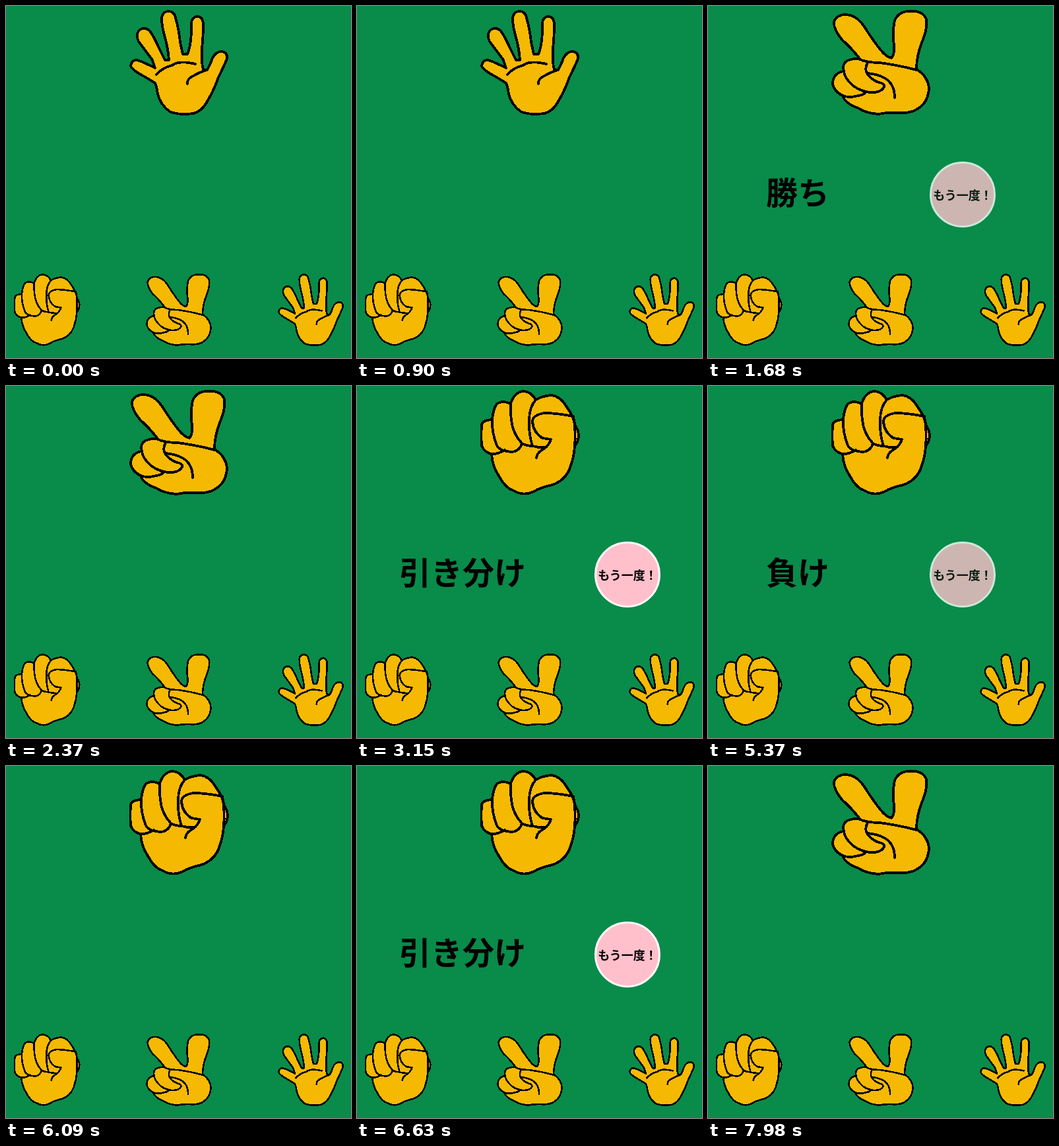
An HTML page for the animation above (8000 ms loop, 523 px wide and 534 px high).

```html
<!DOCTYPE html>
<html lang="ja">
<head>
<meta charset="utf-8">
<title>じゃんけん</title>
<style>
  html, body { margin: 0; width: 100%; height: 100%; overflow: hidden; background: #098b4a; }
  svg { display: block; width: 100%; height: 100%; }
  .hand path { fill: none; stroke: #000; stroke-width: 3.8; stroke-linejoin: round; stroke-linecap: round; shape-rendering: crispEdges; }
  .hand .skin { fill: #f6b902; }
  text { font: bold 48px "Noto Sans CJK JP", "Noto Sans CJK", sans-serif; }
  #retry text { font-size: 18px; text-anchor: middle; }
</style>
</head>
<body>
<svg viewBox="0 0 523 534">
  <defs>
    <g id="rock" class="hand">
      <path class="skin" d="M205 51Q191 52 189 58Q188 75 189 91Q194 101 204 103Q205 122 216 138Q225 155 238 159Q252 167 266 161
        Q280 153 296 150Q316 143 323 124Q329 108 330 91Q336 84 336 74Q335 65 331 61Q328 45 318 32Q309 16 295 14
        Q281 15 271 21Q264 8 251 8Q238 10 233 27Q221 21 212 27Q206 36 205 51Z"/>
      <path d="M205 51Q204 70 212 90Q216 99 236 100Q247 98 250 87Q236 72 234 52Q232 39 233 27"/>
      <path d="M204 103Q213 104 224 97M271 21Q261 32 261 52Q260 72 266 91Q257 91 250 87"/>
      <path d="M328 46Q302 41 284 41Q266 44 266 54Q267 70 281 79L294 81Q291 90 284 95Q273 100 272 109"/>
      <path d="M266 91Q277 94 286 93M328 46Q332 70 330 91"/>
    </g>
    <g id="scissors" class="hand">
      <path class="skin" d="M230 80Q217 63 203 51Q190 35 191 24Q195 13 209 13Q225 14 236 30Q252 55 262 67Q270 77 278 79
        Q283 74 282 60Q279 40 283 22Q289 8 305 8Q325 6 331 20Q333 34 325 53Q316 75 316 96Q334 107 335 126
        Q333 148 316 157Q306 163 290 162Q272 161 258 164Q238 162 228 155Q208 148 204 136Q189 128 189 116
        Q191 101 206 99Q203 88 211 83Q220 79 230 80Z"/>
      <path d="M228 80Q240 86 260 86Q290 90 316 97"/>
      <path d="M242 86Q237 95 241 102Q246 111 259 116Q268 117 267 123Q262 132 245 131Q225 128 215 116Q207 108 206 99"/>
      <path d="M241 102Q254 103 263 107Q283 115 283 139M204 136Q214 140 228 136Q236 135 240 130"/>
    </g>
    <g id="paper" class="hand">
      <path class="skin" d="M226 117Q222 114 208 106Q191 97 189 91Q190 82 198 82Q204 83 226 94L222 82Q212 68 201 54
        Q196 42 203 36Q211 31 218 38Q224 46 232 64L241 82L247 82Q246 65 240 44Q236 30 236 18Q238 8 246 8
        Q255 8 257 18Q262 35 264 55L268 73L275 73Q280 62 281 40Q280 28 282 21Q286 15 292 16Q299 18 299 28
        Q299 45 297 65L297 85Q298 95 300 97L305 97Q309 90 313 79Q318 69 327 69Q336 70 335 80Q331 90 322 108
        Q315 128 306 143Q297 160 284 163Q262 166 248 160Q234 150 230 133Q228 120 226 117Z"/>
      <path d="M228 104Q238 93 252 90Q262 82 287 88M305 97Q292 101 286 105Q274 110 275 118"/>
    </g>
  </defs>

  <use id="opponent"/>
  <g id="choices"></g>
  <g id="result">
    <text id="verdict" y="301"></text>
    <g id="retry">
      <circle cy="286" r="48.5" fill="#ffc0cb" stroke="#fff" stroke-width="3"/>
      <text y="294">もう一度！</text>
    </g>
  </g>
</svg>
<script>
  const LOOP = 8000, STEP = 30, SHUFFLE = 40;
  const ROW_LEFT = 12, ROW_WIDTH = 500, FONT_SIZE = 48, BUTTON = 100;
  const HANDS = ['rock', 'scissors', 'paper'];
  const $ = id => document.getElementById(id);

  // Each phase lasts until the next one begins. Shuffles count from `origin` and stop at `hold`.
  const PHASES = [
    { at: 0, hand: 2 },
    { at: 60, origin: 40, hold: 120 },
    { at: 270, origin: 200, hold: 1050 },
    { at: 1080, hand: 1, verdict: '勝ち', hover: 1680 },
    { at: 2070, origin: 2070, hold: 2820 },
    { at: 2910, hand: 0, verdict: '引き分け', hover: 3660 },
    { at: 3930, origin: 3900, hold: 4710 },
    { at: 4740, hand: 0, verdict: '負け', hover: 5370 },
    { at: 5730, origin: 5700, hold: 6510 },
    { at: 6540, hand: 0, verdict: '引き分け', hover: 7350 },
    { at: 7590, origin: 7580, hold: 7980 }
  ];

  $('choices').innerHTML = HANDS.map((hand, i) =>
    `<use href="#${hand}" transform="translate(${12 + 200 * i} 406) scale(.6667 .6875) translate(-187 -6)"/>`).join('');

  function draw(time) {
    const t = Math.floor(time % LOOP / STEP) * STEP;
    const phase = PHASES.findLast(p => p.at <= t);
    const hand = phase.hand ?? Math.floor((Math.min(t, phase.hold) - phase.origin) / SHUFFLE) % 3;
    $('opponent').setAttribute('href', '#' + HANDS[hand]);

    const { verdict } = phase;
    $('result').style.display = verdict ? '' : 'none';
    if (!verdict) return;
    // Text and button share the row with equal space around each.
    const width = verdict.length * FONT_SIZE;
    const space = (ROW_WIDTH - width - BUTTON) / 4;
    $('verdict').textContent = verdict;
    $('verdict').setAttribute('x', ROW_LEFT + space);
    $('retry').setAttribute('transform', `translate(${ROW_LEFT + 3 * space + width + BUTTON / 2} 0)`);
    $('retry').style.opacity = t >= phase.hover ? 0.8 : 1;
  }

  const start = performance.now();
  function tick() {
    draw(performance.now() - start);
    requestAnimationFrame(tick);
  }
  tick();
</script>
</body>
</html>
```
